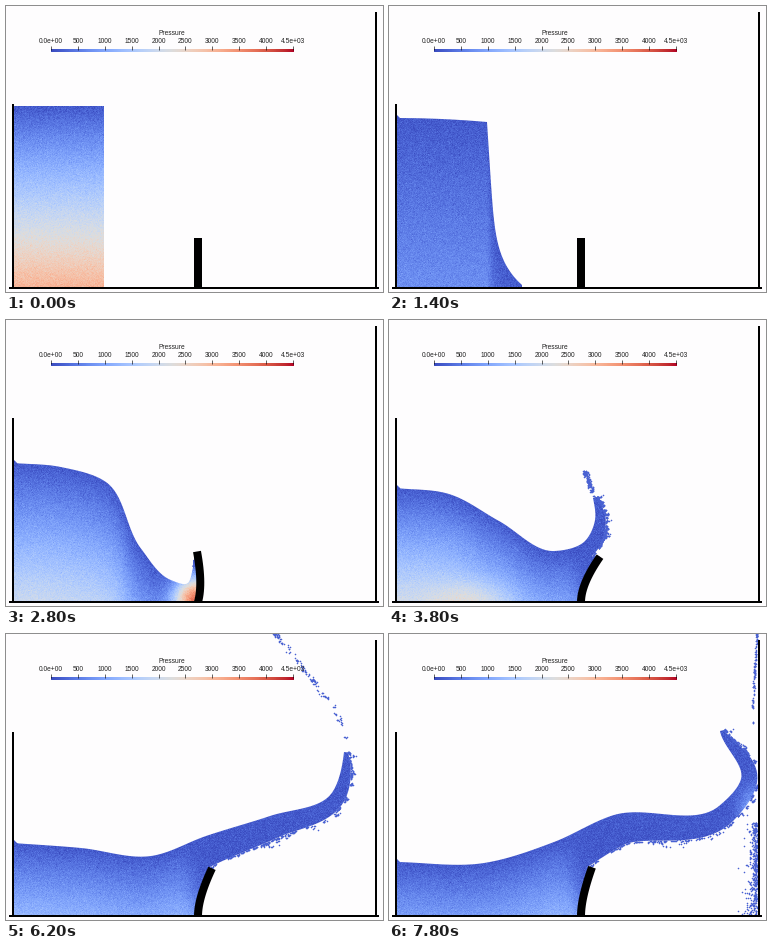
These frames come from a looping animation (377x286 px, 8 s). A matplotlib script:

```python
import numpy as np
import matplotlib.pyplot as plt
from matplotlib.animation import FuncAnimation
from matplotlib.patches import Polygon

W, H, DPI = 377, 286, 100
FRAMES, STEP = 40, 200
PX = 72 / DPI
P_MAX = 4500
LEFT, FLOOR, WALL, DAM, GATE = 7, 282, 369, 98, 192
HIT = 2.8  # time at which the wave runs up the gate


def spline(ks, ys, k):
    """Smooth curve through the points ys at knots ks."""
    ks, ys = np.asarray(ks, float), np.asarray(ys, float)
    pad = (1,) * (ys.ndim - 1)
    h = np.diff(ks).reshape(-1, *pad)
    d = np.diff(ys, axis=0) / h
    mid = (d[:-1] * h[1:] + d[1:] * h[:-1]) / (h[:-1] + h[1:])
    m = np.concatenate([d[:1], mid, d[-1:]])
    k = np.atleast_1d(k)
    j = np.clip(np.searchsorted(ks, k, "right") - 1, 0, len(ks) - 2)
    hj = h[j]
    u = (k - ks[j]).reshape(-1, *pad) / hj
    return ((1 + 2 * u) * (1 - u) ** 2 * ys[j] + u * (1 - u) ** 2 * hj * m[j]
            + u * u * (3 - 2 * u) * ys[j + 1]
            + u * u * (u - 1) * hj * m[j + 1])


def path(points, u):
    """Curve through points; u counts points, spacing follows distance."""
    gaps = np.hypot(*np.diff(points, axis=0).T) + 0.01
    knots = np.concatenate([[0], np.cumsum(gaps)])
    return spline(knots, points, np.interp(u, np.arange(len(points)), knots))


def ramp(t, start, length):
    return np.clip((t - start) / length, 0, 1)


def pulse(t, mid, width):
    return np.exp(-((t - mid) / width) ** 2)


def falling(t):
    """Free surface of the collapsing column."""
    r = t / 1.4
    left, shoulder = 100 + 12 * r ** 1.84, 100 + 16 * r ** 1.85
    toe = min(189, DAM + 35 * r ** 1.71)
    v = np.linspace(0, 1, 60)
    lid = np.stack([LEFT + v * (DAM - LEFT),
                    left + (shoulder - left) * v ** 2], 1)
    late = ramp(t, 1.4, 1.4)
    a, n = 0.3 + 0.3 * late, 7 - 3 * late
    x = DAM + (toe - DAM) * (a * v + (1 - a) * v ** n)
    y = shoulder + (281 - 2 * r - shoulder) * v
    y = y - 40 * ramp(t, 2.4, 0.4) * np.exp((x - 189) / 5)
    return np.concatenate([lid, np.stack([x, y], 1)])


# Inner side of the jet: pool, trough, bend, root of the tail, tail end
FIRST = falling(HIT)
first_x = np.array([7, 55, 100, 135, 165, 181, 187, 189])
JET_T = [HIT, 3.8, 5.0, 6.2, 7.8]
JET = [
    np.stack([first_x, np.interp(first_x, *FIRST.T)], 1),
    [(7, 168), (60, 174), (110, 201), (165, 231), (196, 221), (206, 200),
     (204, 178), (196, 152)],
    [(7, 190), (70, 196), (145, 223), (205, 209), (250, 185), (269, 158),
     (262, 112), (204, 53)],
    [(7, 209), (75, 214), (145, 222), (200, 202), (264, 182), (325, 160),
     (338, 118), (268, -4)],
    [(7, 228), (95, 229), (165, 208), (225, 181), (330, 172), (352, 145),
     (331, 97), (364, -5)],
]
ROOT = 6


def gate_line(t):
    lean = spline([2.4, 2.8, 3.8, 5.0, 6.2, 7.8], [0, -1, 19, 23, 14, 11],
                  max(t, 2.4))[0]
    base, bend, tip = np.array([
        [GATE, FLOOR], [GATE + 5 * pulse(t, HIT, 0.25), 264],
        [GATE + lean, 231.5 + lean ** 2 / 70]])
    u = np.linspace(0, 1, 16)[:, None]
    return (1 - u) ** 2 * base + 2 * u * (1 - u) * bend + u * u * tip


def normals(line):
    d = np.gradient(line, axis=0)
    return (np.stack([-d[:, 1], d[:, 0]], 1)
            / (np.hypot(*d.T)[:, None] + 1e-6))


def outer_side(top, tip, t):
    """Offset the jet's inner side; it grows thicker away from its end."""
    steps = np.hypot(*np.diff(top, axis=0).T)
    dist = np.concatenate([np.cumsum(steps[::-1])[::-1], [0]])
    width = 4 + 8 * (1 - np.exp(-dist / 25)) + 0.1 * dist
    low = top + normals(top) * (width * ramp(t, HIT, 0.6))[:, None]
    return low[(low[:, 1] < tip[1]) & (low[:, 0] > GATE)][::-1]


def water(t):
    """Outline of the water, its surface, outer side, tail line and gate."""
    gate = gate_line(t)
    low = tail = np.empty((0, 2))
    if t < HIT:
        top = falling(t)
        end = gate[::-1] if t > 2.4 else [(top[-1, 0], FLOOR)]
    else:
        points = spline(JET_T, JET, t)[0]
        top = path(points, np.linspace(0, ROOT, 140))
        tail = path(points, ROOT + tail_s)
        low = outer_side(top, gate[-1], t)
        end = np.concatenate([low, gate[::-1]])
    corner = [(LEFT, top[0, 1] - 4 * ramp(t, 0, 1.4)), (LEFT + 4, top[0, 1])]
    body = np.concatenate([corner, top[top[:, 0] > LEFT + 4], end,
                           [(LEFT, FLOOR)]])
    body[:, 0] = np.minimum(body[:, 0], WALL)
    return body, top, low, tail, gate


YY, XX = np.mgrid[0:H, 0:W] + 0.5
BEHIND_GATE = 1 / (1 + np.exp((XX - 192 + (FLOOR - YY) * 0.2) / 6))


def spot(x, y, sx, sy):
    return pulse(XX, x, sx) * pulse(YY, y, sy)


def pressure(t, top, rng):
    surface = np.interp(XX[0], np.maximum.accumulate(top[:, 0]), top[:, 1])
    depth = np.maximum(YY - surface, 0)
    slope = np.interp(t, [0, 1.4, 3.4, 7.8], [16, 3.4, 17, 14])
    # A fading wave runs along the bed towards the gate
    p = depth * slope + 800 * pulse(t, 4.4, 0.9) * spot(
        85 + 67 * (t - 3.8), 280, 38, 20)
    p = 150 + p * (BEHIND_GATE if t > 2 else 1)
    p += 3300 * pulse(t, HIT, 0.35) * spot(188, 279, 20, 22)
    p += 1200 * ramp(t, 6.6, 0.5) * spot(WALL, 178, 16, 22)
    return p + rng.normal(0, 90, p.shape)


seed = np.random.default_rng(4)


def clumps(values, size):
    return np.repeat(values, size, axis=0)


tail_s = np.clip(clumps(seed.random(38) ** 0.8, 4)
                 + seed.normal(0, 0.012, 152), 0, 1)
tail_off = (clumps(seed.normal(0, 1.2, (38, 2)), 4)
            + seed.normal(0, 0.9, (152, 2)))
rim_s = np.clip(clumps(seed.random(50), 7) + seed.normal(0, 0.005, 350), 0, 1)
rim_off = clumps(seed.exponential(2.3, 50), 7) * seed.random(350)
drip_u = seed.random(420)
drip_x = seed.exponential(2.6, 420) * (1 + 2 * drip_u ** 8)


def droplets(t, low, tail):
    grow = ramp(t, HIT, 1.2)
    parts = [np.empty((0, 2))]
    if len(tail):
        tail = tail + tail_off * grow * (1 + ramp(t, 6.4, 1.4))
        tail[:, 0] += (WALL - tail[:, 0]) * 0.85 * ramp(t, 6.4, 1.2)
        parts.append(tail)
    if len(low) > 3:
        at = rim_s * (len(low) - 1)
        own = np.arange(len(low))
        out = -normals(low)
        rim = [np.interp(at, own, low[:, k])
               + np.interp(at, own, out[:, k]) * rim_off * grow
               for k in (0, 1)]
        parts.append(np.stack(rim, 1))
    run = ramp(t, 6.8, 0.9)
    if run > 0:
        parts.append(np.stack([368 - drip_x * run, 188 + drip_u * 93 * run], 1))
    dots = np.concatenate(parts)
    dots[:, 0] = np.minimum(dots[:, 0], WALL - 1)
    return dots


fig = plt.figure(figsize=(W / DPI, H / DPI), dpi=DPI, facecolor="#fefdfe")
ax = fig.add_axes([0, 0, 1, 1])
ax.axis("off")

image = ax.imshow(np.zeros((H, W)), cmap="coolwarm", vmin=0, vmax=P_MAX,
                  extent=(0, W, H, 0), aspect="auto",
                  interpolation="nearest", zorder=1)
outline = ax.add_patch(Polygon([(0, 0), (1, 0), (1, 1)], fc="none", ec="none"))
spray = ax.scatter([], [], s=(1.6 * PX) ** 2, lw=0, zorder=2,
                   color=plt.get_cmap("coolwarm")(0.05))


def line(x, y, width, z=3):
    return ax.plot(x, y, color="black", lw=width * PX, zorder=z,
                   solid_capstyle="butt")[0]


line([LEFT, LEFT], [98, FLOOR], 2)
line([WALL + 0.5] * 2, [6, FLOOR], 2)
line([3, 373], [FLOOR, FLOOR], 2)
gate_art = line([], [], 8)


def label(x, y, text):
    ax.text(x, y, text, ha="center", va="center", zorder=5, color="#222222",
            family="Liberation Sans", fontsize=6.7 * PX)


# Colour bar
ax.imshow(np.linspace(0, 1, 243)[None], cmap="coolwarm", aspect="auto",
          extent=(45, 288, 46, 43), zorder=4)
label(166, 27.5, "Pressure")
for value in [*range(0, 4001, 500), P_MAX]:
    x = 45 + 242 * value / P_MAX
    ends = value in (0, P_MAX)
    label(x, 35.5, f"{value:.1e}" if ends else str(value))
    line([x, x], [40, 43.5], 0.6, z=5)

ax.set_xlim(0, W)
ax.set_ylim(H, 0)


def draw(i):
    t = i * STEP / 1000
    body, top, low, tail, gate = water(t)
    image.set_data(pressure(t, top, np.random.default_rng(i)))
    outline.set_xy(body)
    image.set_clip_path(outline)
    spray.set_offsets(droplets(t, low, tail))
    gate_art.set_data(gate[:, 0], gate[:, 1])
    return image, spray, gate_art


anim = FuncAnimation(fig, draw, frames=FRAMES, interval=STEP, repeat=True,
                     repeat_delay=0, blit=False)
plt.show()
```
